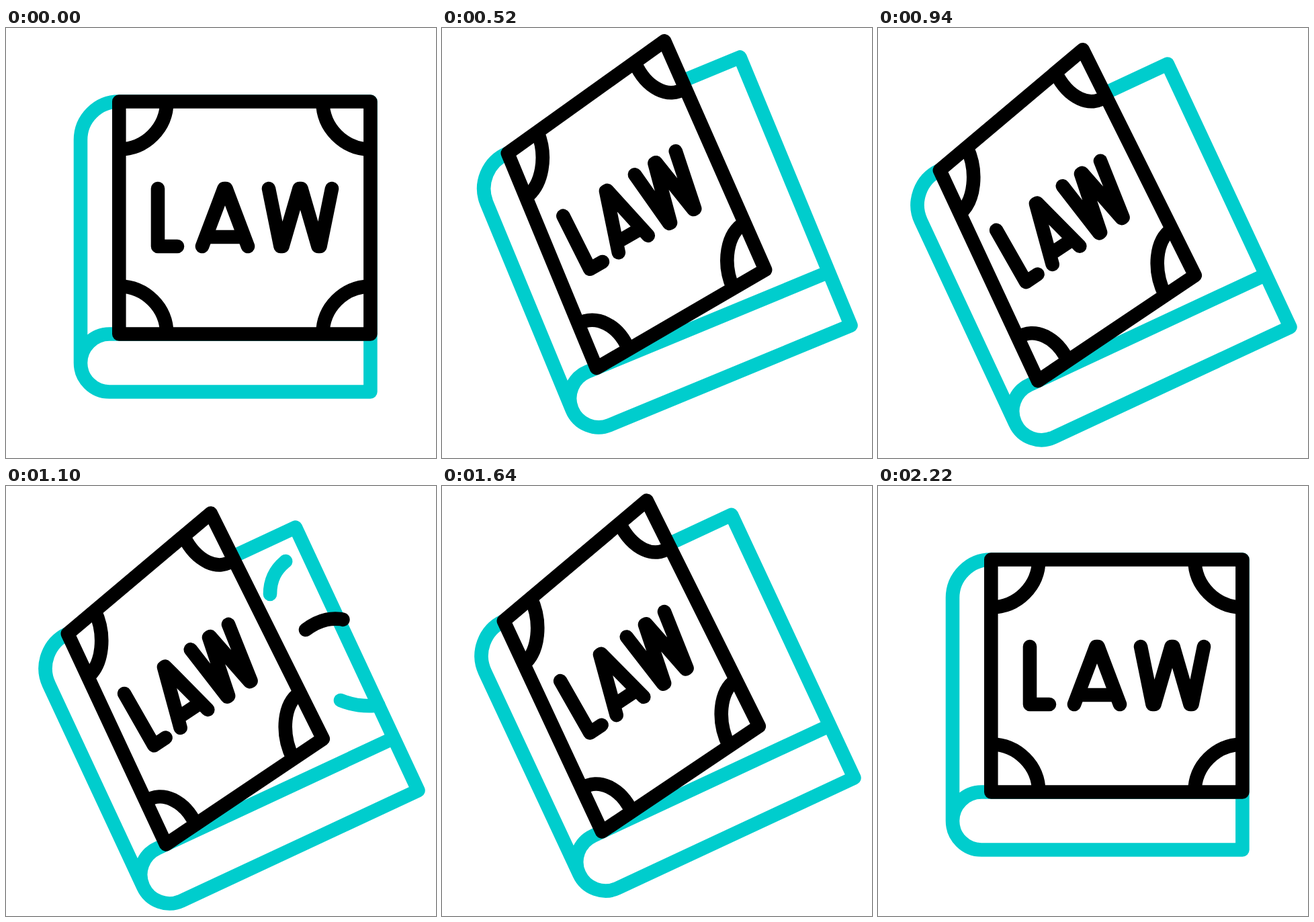
Write an HTML page that moves like this. It is 640 px wide and 640 px high and loops after 2420 ms.

```html
<!DOCTYPE html>
<html lang="en">
<head>
<meta charset="utf-8">
<title>Law book</title>
<style>
  html, body { margin: 0; width: 100%; height: 100%; overflow: hidden; background: #fff; }
  svg { display: block; width: 100%; height: 100%; }
  path { fill: none; stroke: #000; stroke-width: 20.6; stroke-linecap: round; stroke-linejoin: round; }
  .teal { stroke: #00cdcd; }
  #cover { fill: #fff; }
  #corners { stroke-linecap: butt; }
</style>
</head>
<body>
<svg viewBox="0 0 640 640">
  <g id="book">
    <path class="teal" d="M154 455.5H542M168 109.5A57 57 0 0 0 111 166.5V498.5A43 43 0 0 0 154 541.5H542.4V109.5ZM111 498.5A43 43 0 0 1 154 455.5"/>
    <path id="cover"/>
    <path id="corners"/>
    <path id="letters"/>
  </g>
  <g id="sparks">
    <path class="teal" d="M393 161C393 138 402 124 415 113S445 92 449 45"/>
    <path d="M446 214C470 196 488 197 498 198S535 222 580 200"/>
    <path class="teal" d="M498 319C515 326 532 328 548 327S580 298 628 306"/>
  </g>
</svg>
<script>
const LOOP = 2420;
const LEFT = 168.3, RIGHT = 542.4, TOP = 109.5, BOTTOM = 455.5;
const CORNER_RADIUS = 71;
const CIRCLE = 0.5523; // Bezier handle length of a quarter circle
const CAP = 239, BASE = 325;

const $ = id => document.getElementById(id);

// Smooth progress from time a to time b.
function ease(t, a, b) {
  const u = Math.min(1, Math.max(0, (t - a) / (b - a)));
  return u * u * (3 - 2 * u);
}

const add = (p, q, k = 1) => [p[0] + q[0] * k, p[1] + q[1] * k];
const sub = (p, q) => add(p, q, -1);
const mix = (p, q, k) => add(p, sub(q, p), k);
const line = points => "M" + points.join("L");

// The spine side stays; the free edge swings in and up.
function coverCorners(open) {
  return [
    [LEFT, TOP],
    mix([RIGHT, TOP], [437, 37], open),
    mix([RIGHT, BOTTOM], [446.5, 412], open),
    [LEFT, BOTTOM]
  ];
}

// Quarter round at a corner, skewed along its two edges.
function cornerArc(corner, beside, below) {
  const across = mix([0, 0], sub(beside, corner), CORNER_RADIUS / (RIGHT - LEFT));
  const down = mix([0, 0], sub(below, corner), CORNER_RADIUS / (BOTTOM - TOP));
  const start = add(corner, across), end = add(corner, down);
  return `M${start}C${add(start, down, CIRCLE)} ${add(end, across, CIRCLE)} ${end}`;
}

// Letters narrow and rise more the farther they are from the spine.
const skew = ([x, y], open) => {
  const dx = x - 226, dy = y - CAP;
  return [x + open * (0.085 * dy - 0.29 * dx - 19), y + open * (0.03 * dy - 0.108 * dx - 13)];
};

// Stroke that alternates between two heights; inner joints get a short flat.
function zigzag(xs, first, second) {
  return xs.flatMap((x, i) => {
    const y = i % 2 ? second : first;
    const outer = i === 0 || i === xs.length - 1;
    return outer ? [[x, y]] : [[x - 1.5, y], [x + 1.5, y]];
  });
}

const LETTERS = [
  [[226, CAP], [226, BASE], [255, BASE]],
  zigzag([292, 326, 360], BASE, CAP),
  [[298, 311], [354, 311]],
  zigzag([391, 410, 438, 466, 485], CAP, BASE)
];

const sparks = [...$("sparks").children].map(el => ({ el, size: el.getTotalLength() }));

function draw(t) {
  const open = ease(t, 200, 600) - ease(t, 1800, 2200);
  const drop = 25 * (ease(t, 600, 1200) - ease(t, 1200, 1800));
  $("book").setAttribute("transform", `translate(0 ${drop}) rotate(${-25 * open} 326.5 325.5)`);

  const [tl, tr, br, bl] = coverCorners(open);
  $("cover").setAttribute("d", line([tl, tr, br, bl]) + "Z");
  $("corners").setAttribute("d",
    cornerArc(tl, tr, bl) + cornerArc(tr, tl, br) + cornerArc(br, bl, tr) + cornerArc(bl, br, tl));
  $("letters").setAttribute("d",
    LETTERS.map(stroke => line(stroke.map(p => skew(p, open)))).join(""));

  const head = ease(t, 940, 1300), tail = ease(t, 1300, 1600);
  for (const { el, size } of sparks) {
    const shown = (head - tail) * size;
    el.style.display = shown > 0.1 ? "" : "none";
    el.style.strokeDasharray = `${shown} ${size * 2}`;
    el.style.strokeDashoffset = -tail * size;
  }
}

const began = performance.now();
function tick() {
  draw((performance.now() - began) % LOOP);
  requestAnimationFrame(tick);
}
tick();
</script>
</body>
</html>
```
